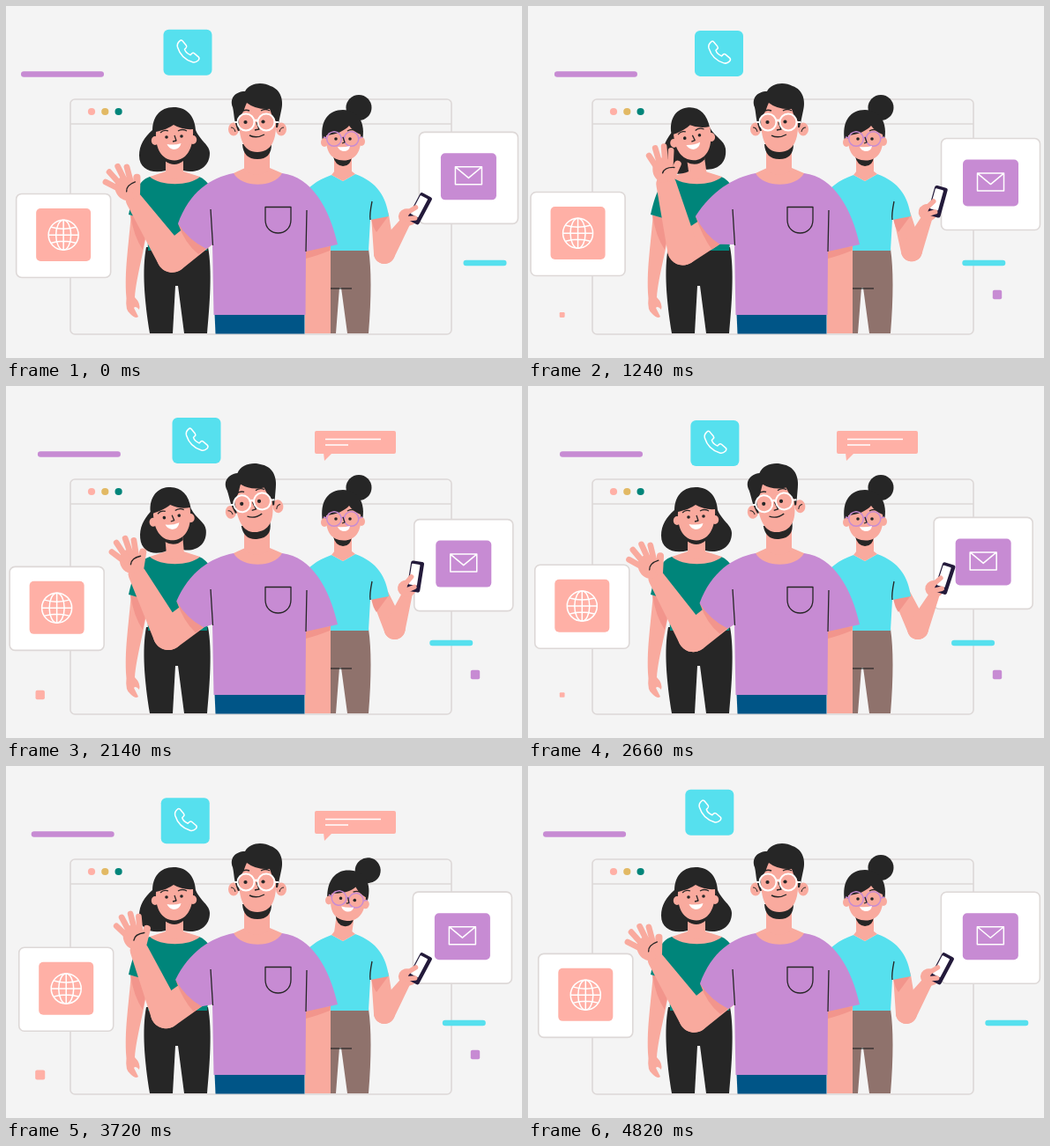
Write an HTML page with a canvas that moves like this. It is 585x400 px and loops after 4.84 s.

```html
<!DOCTYPE html>
<html lang="en">
<head>
<meta charset="utf-8">
<title>Team greeting</title>
<style>
html, body { margin: 0; width: 100%; height: 100%; overflow: hidden; background: #f4f4f4; }
canvas { display: block; width: 585px; height: 400px; }
</style>
</head>
<body>
<canvas id="stage"></canvas>
<script>
const W = 585, H = 400, LOOP = 4840, TAU = Math.PI * 2;
const canvas = document.getElementById('stage');
const ctx = canvas.getContext('2d');
const dpr = window.devicePixelRatio || 1;
canvas.width = W * dpr;
canvas.height = H * dpr;

const C = {
  bg: '#f4f4f4', line: '#ddd8d7', white: '#fff', ink: '#262626',
  pink: '#ffb0a6', cyan: '#56e0ee', purple: '#c78bd3', gold: '#e2b964',
  green: '#00857a', blue: '#005587', brown: '#8f726c', phone: '#231a3a',
  skin: '#f9aa9e', shade: '#f2958c'
};

// ---- drawing helpers ----
function fill(d, color) {
  ctx.fillStyle = color;
  ctx.fill(new Path2D(d));
}
function stroke(d, color, width = 1.3) {
  ctx.strokeStyle = color;
  ctx.lineWidth = width;
  ctx.stroke(new Path2D(d));
}
function dot(x, y, r, color, ry = r) {
  ctx.beginPath();
  ctx.ellipse(x, y, r, ry, 0, 0, TAU);
  ctx.fillStyle = color;
  ctx.fill();
}
function ring(x, y, rx, color, width, ry = rx) {
  ctx.beginPath();
  ctx.ellipse(x, y, rx, ry, 0, 0, TAU);
  ctx.strokeStyle = color;
  ctx.lineWidth = width;
  ctx.stroke();
}
function box(x, y, w, h, r, color, border) {
  ctx.beginPath();
  ctx.roundRect(x, y, w, h, r);
  if (color) { ctx.fillStyle = color; ctx.fill(); }
  if (border) { ctx.strokeStyle = border; ctx.lineWidth = 1.6; ctx.stroke(); }
}
function at(x, y, draw, deg = 0, scaleX = 1, scaleY = scaleX) {
  ctx.save();
  ctx.translate(x, y);
  ctx.rotate(deg * Math.PI / 180);
  ctx.scale(scaleX, scaleY);
  draw();
  ctx.restore();
}
// Turn or squeeze a drawing made in stage coordinates about a point.
function about(x, y, draw, deg, scaleX = 1) {
  at(x, y, () => { ctx.translate(-x, -y); draw(); }, deg, scaleX, 1);
}
// Tapered limb: hull of two circles.
function limb(ax, ay, ra, bx, by, rb, color) {
  const dir = Math.atan2(by - ay, bx - ax);
  const open = Math.acos((ra - rb) / Math.hypot(bx - ax, by - ay));
  ctx.beginPath();
  ctx.arc(ax, ay, ra, dir + open, dir - open + TAU);
  ctx.arc(bx, by, rb, dir - open, dir + open);
  ctx.closePath();
  ctx.fillStyle = color;
  ctx.fill();
}

// ---- timing helpers ----
const mix = (a, b, k) => a + (b - a) * k;
const wave = (p, peak) => Math.cos(TAU * (p - peak));
// Eased keyframes: rows of [time, ...values].
function track(keys, t) {
  if (t <= keys[0][0]) return keys[0].slice(1);
  for (let i = 1; i < keys.length; i++) {
    const a = keys[i - 1], b = keys[i];
    if (t <= b[0]) {
      const k = (t - a[0]) / (b[0] - a[0]), e = k * k * (3 - 2 * k);
      return a.slice(1).map((v, j) => mix(v, b[j + 1], e));
    }
  }
  return keys[keys.length - 1].slice(1);
}

const ARM_WAVE = [[0, .87], [780, .08], [1660, .36], [2500, .85], [2660, .82], [3260, 0], [4160, 1], [4840, .87]];
const LEFT_TURN = [[250, 0], [650, 1], [1950, 1], [2400, 0]];
const MAN_TILT = [[1200, 0], [2100, -7], [2750, -7], [3150, 0]];
const RIGHT_TILT = [[2800, 0], [3200, 8], [4200, 8], [4700, 0]];
// elbow x, y, wrist x, y, device x, y, device angle
const DEVICE = [
  [950, 429, 281, 453, 245, 468.5, 230, 28],
  [1500, 440, 276, 452, 237, 460, 215.5, 5],
  [1900, 440, 276, 452, 237, 460, 215.5, 5],
  [2550, 442, 276, 460, 239, 472, 218.5, 18],
  [2700, 442, 276, 460, 239, 472, 218.5, 18],
  [3200, 429, 281, 453, 245, 468.5, 230, 28]
];
const BUBBLE = [[1250, 0, -14], [1600, 1, 6], [1720, 1, 4], [1950, 1, 0], [3800, 1, 0], [4190, 0, 0]];
const PURPLE_DOT = [[400, 0], [700, 1], [3750, 1], [4050, 0]];
const PINK_DOT = [[1050, 0], [1400, 1], [2300, 1], [2650, .55], [3000, 1.1], [3400, 1.1], [4160, 1], [4500, 0]];

// ---- floating interface pieces ----
function bar(x, y, w, color) {
  box(x, y - 3.2, w, 6.4, 3.2, color);
}
function browser() {
  box(73, 106, 432, 267, 5, null, C.line);
  stroke('M73 134H505', C.line, 1.6);
  [C.pink, C.gold, C.green].forEach((c, i) => dot(97 + i * 15.3, 120, 4.1, c));
}
function callTile() {
  box(0, 0, 55, 52, 6, C.cyan);
  ctx.translate(28, 25);
  stroke('M-6.5-12.2L-2.2-7Q-1-5.5-2.5-4L-4-2.5Q-3 1.5 2.5 4L4 2.5Q5.5 1 7 2.2L12 6.5Q13.2 8 11.5 10' +
    'Q8.5 13 5 12Q-8 8-12-5Q-13-9-9.5-12Q-8-13.5-6.5-12.2Z', C.white, 1.5);
}
function globeCard() {
  box(0, 0, 107, 95, 6, C.white, C.line);
  box(22.5, 16.5, 62, 60, 5, C.pink);
  ctx.translate(53.5, 46.8);
  ring(0, 0, 17, C.white, 1.5);
  ring(0, 0, 8.5, C.white, 1.5, 17);
  stroke('M0-17V17M-17 0H17M-14-9Q0-5 14-9M-14 9Q0 5 14 9', C.white, 1.5);
}
function mailCard() {
  box(0, 0, 112, 104, 6, C.white, C.line);
  box(24.5, 24, 63, 53, 5, C.purple);
  stroke('M41 39.5H71V59.5H41ZM41 39.5L56 52L71 39.5', C.white, 1.5);
}
function bubble(t) {
  const [scale, deg] = track(BUBBLE, t);
  if (scale < .01) return;
  at(361, 85, () => {
    box(-11, -34, 92, 26, 2, C.pink);
    fill('M-1-9L0 0L9-9Z', C.pink);
    stroke('M1-24.5H64M1-18H27', C.white, 1.3);
  }, deg, scale);
}
function popDot(x, y, size, color) {
  if (size > .02) at(x, y, () => box(-5.2, -5.2, 10.4, 10.4, 2, color), 0, size);
}

// ---- people ----
function leftWoman(t) {
  // resting arm and hand
  fill('M142 234C139 275 134 300 136.5 332Q135 346 141 350Q147 356 150 353L145 343Q147 340 151 345' +
    'Q153 338 146 331C148 305 157 280 162 240Z', C.skin);
  fill('M141 238L162 242L155 277Q145 262 141 238Z', C.shade);
  fill('M159 274H229C234 300 231 340 228 372H202L195 318H192L189 372H163C157 335 154 300 159 274Z', C.ink);
  fill('M163 194C150 198 144 215 139 237L160 243L161 278H228L235 210Q226 196 219 194Z', C.green);
  fill('M163 194C175 205 208 205 220 194L201 188H181Z', C.skin);

  const turn = track(LEFT_TURN, t)[0];
  about(188, 180, () => {
    about(182, 180, () => fill('M190 115C174 115 166 127 166 141C157 149 151 158 151 170C151 186 166 191 181 187H201' +
      'C216 191 231 184 231 167C231 158 220 153 215 141C214 125 205 115 190 115Z', C.ink), 0, 1 - .1 * turn);
    fill('M181 168H201V194Q191 199 181 194Z', C.skin);
    fill('M180 170Q191 177 201 170V176Q191 184 180 176Z', C.ink);
    dot(169, 153, 4.2, C.skin, 5);
    dot(212, 152, 4.2, C.skin, 5);
    fill('M170 143C179 141 186 138 190 135Q200 141 212 140C213 158 207 175 191 175.5C176 175 169 162 170 143Z', C.skin);
    dot(182, 149, 1.8, C.ink);
    dot(199, 148, 1.8, C.ink);
    stroke('M175 144Q179 140 184 142M195 142Q200 139 205 142M191 147L193 153L189 154', C.ink);
    fill('M182.5 157Q191 158.5 198.5 156Q197 163 190 163Q184.500 162 182.500 157Z', C.white);
  }, -8 * turn);
}

function rightWoman(t) {
  const [ex, ey, wx, wy, px, py, angle] = track(DEVICE, t);
  fill('M366 276H411Q416 310 411 372H387L380 320H378L374 372H358Z', C.brown);
  stroke('M366 321H392', C.ink, 1.2);

  limb(424, 238, 10, ex, ey, 12, C.skin);
  fill('M414 241L434 238L420 257Q416 252 414 241Z', C.shade);
  limb(ex, ey, 12, wx, wy, 6, C.skin);

  fill('M369 192C352 198 341 207 336 216L345 278H411L413 243L434 239C431 217 421 200 396 191L382 199Z', C.cyan);
  stroke('M415 222Q412 237 413 243', C.ink);
  fill('M369 192L382 199L396 191L391 187H373Z', C.skin);

  at(px, py, () => {
    dot(-7, 15, 10.5, C.skin, 9.5);
    box(-7, -17.5, 15, 35, 2.5, C.phone);
    box(-5.8, -14, 9.5, 24, 1, C.white);
    ctx.lineCap = 'round';
    stroke('M-10 11L-4 1M-7 17L1 12', C.skin, 5.5);
  }, angle);

  about(382, 190, () => {
    dot(400, 115.5, 14.5, C.ink);
    fill('M359 154C355 130 366 118 382 118C399 118 408 132 404 153Z', C.ink);
    fill('M372 168H392V190Q382 199 372 190Z', C.skin);
    fill('M371 171Q382 177 392 171Q391 182 382 182Q373 181 371 171Z', C.ink);
    dot(361, 155, 4, C.skin, 5);
    dot(403, 154, 4, C.skin, 5);
    fill('M363 147C374 146 384 142 389 136Q394 143 402 146C404 165 396 175.500 383 175.500C368 175.500 362 164 363 147Z', C.skin);
    dot(374, 151, 1.8, C.ink);
    dot(390, 151, 1.8, C.ink);
    ring(372, 151, 8.3, C.purple, 1.5);
    ring(391.5, 151, 8.3, C.purple, 1.5);
    stroke('M380 150Q382 148 384 150M360 149L364 150M400 150L404 149', C.purple, 1.5);
    stroke('M367 143Q371 140 376 142M387 142Q392 139 397 142M382 149L384 155L381 156', C.ink);
    fill('M376 160Q383 161 390 159Q389 165.500 382 165Q377.500 164 376 160Z', C.white);
  }, track(RIGHT_TILT, t)[0]);
}

function wavingHand(w) {
  const spread = mix(.8, 1, w);
  ctx.lineCap = 'round';
  dot(-1, -15, 11, C.skin, 13);
  [[-7, -16, -32], [-3, -7, -39], [2, 4, -39.5], [7, 12, -34]].forEach(([x, tipX, tipY]) =>
    stroke(`M${x} -18L${tipX * spread} ${tipY}`, C.skin, 6.2));
  stroke('M6 -5L15 -19', C.skin, 7.5);
  stroke('M-2 -12Q1 -18 11 -16', C.ink, 1.3);
}

function man(t) {
  const w = track(ARM_WAVE, t)[0];
  const ex = mix(171, 191, w), ey = mix(274, 287, w);
  const rad = mix(7, 37, w) * Math.PI / 180;
  const wx = ex - 79 * Math.sin(rad), wy = ey - 77 * Math.cos(rad);
  const ax = mix(188, 196, w), ay = mix(236, 249, w);
  const bx = mix(214, 229, w), by = mix(269, 277, w);

  fill('M339 270L368 268V372H339Z', C.skin);
  fill('M340 277L368 273L367 278Q352 284 340 287Z', C.shade);
  fill('M236.500 349H338.500V372.500H237.500Z', C.blue);

  limb(ex, ey, 17.5, mix(212, 222, w), mix(249, 261, w), 17.5, C.skin);
  fill(`M${ax} ${ay}L${bx} ${by}L${bx - 9} ${by + 6}Q${ax + 8} ${ay + 23} ${ax} ${ay}Z`, C.shade);
  limb(ex, ey, 17.5, wx, wy, mix(12, 9, w), C.skin);
  at(wx, wy, () => wavingHand(w), -mix(0, 36, w), 1.08);

  fill(`M258 190C232 195 208 211 ${ax} ${ay}Q${mix(198, 208, w)} ${mix(258, 267, w)} ${bx} ${by}` +
    'L234 271L235.500 351H339.500L340 279L376 271C367 231 347 194 313 190Z', C.purple);
  fill('M258 190C267 207 304 207 313 190L299 184H271Z', C.skin);
  stroke('M232 231L234.5 272M341 232L340 279', C.ink);
  stroke('M294 228.5H323V243C323 263 294 263 294 243Z', C.ink);

  fill('M270 155H299V187Q285 197 270 187Z', C.skin);
  about(284, 168, () => {
    fill('M268 157H301Q301 174 285 174Q269 174 268 157Z', C.ink);
    dot(258, 140, 6, C.skin, 7.5);
    dot(312, 140, 6, C.skin, 7.5);
    stroke('M255 138Q259 138 260 143M315 138Q311 138 310 143', C.ink, 1);
    fill('M263 142C258 130 259 124 257 115C253 105 260 97 271 97C276 87 291 86 300 91' +
      'C312 95 315 108 312 119L308 138Z', C.ink);
    fill('M264 127C270 121 270 116 273 110Q283 118 299 117Q302 127 306 131C307 152 301 166 285 166' +
      'C269 166 264 151 264 127Z', C.skin);
    dot(271.5, 132, 2.1, C.ink);
    dot(291.5, 131.5, 2.1, C.ink);
    stroke('M267 120Q271 117 276 119M289 119Q294 116 299 119M284 132L287 140L282 141M276 147Q284 151 293 146', C.ink, 1.4);
    ring(272, 132, 9.5, C.white, 2);
    ring(295, 132, 9.5, C.white, 2);
    stroke('M281.5 131Q283.5 128 285.5 131M259 132H263M304 132H309', C.white, 2);
  }, track(MAN_TILT, t)[0]);
}

function draw(t) {
  const p = t / LOOP;
  const drift = Math.sin(Math.PI * p) ** 1.22;
  ctx.setTransform(dpr, 0, 0, dpr, 0, 0);
  ctx.lineCap = 'butt';
  ctx.lineJoin = 'round';
  ctx.fillStyle = C.bg;
  ctx.fillRect(0, 0, W, H);

  browser();
  bar(17 + 19.3 * drift, 77.5, 94, C.purple);
  bar(518.5 - 39 * drift, 292, 49, C.cyan);
  popDot(532, 328, track(PURPLE_DOT, t)[0], C.purple);
  popDot(38.7, 351, track(PINK_DOT, t)[0], C.pink);
  bubble(t);
  at(182.5 + 7.5 * wave(p, .34), 32.3 - 7.3 * wave(p, .11), callTile);
  at(8.8 - 6.3 * wave(p, .325), 208.7 + 5.6 * wave(p, .09), globeCard);
  at(464.8 + 5.3 * wave(p, .13), 147 + 5 * wave(p, .38), mailCard);
  leftWoman(t);
  rightWoman(t);
  man(t);
}

const start = performance.now();
function tick() {
  draw((performance.now() - start) % LOOP);
  requestAnimationFrame(tick);
}
tick();
</script>
</body>
</html>
```
